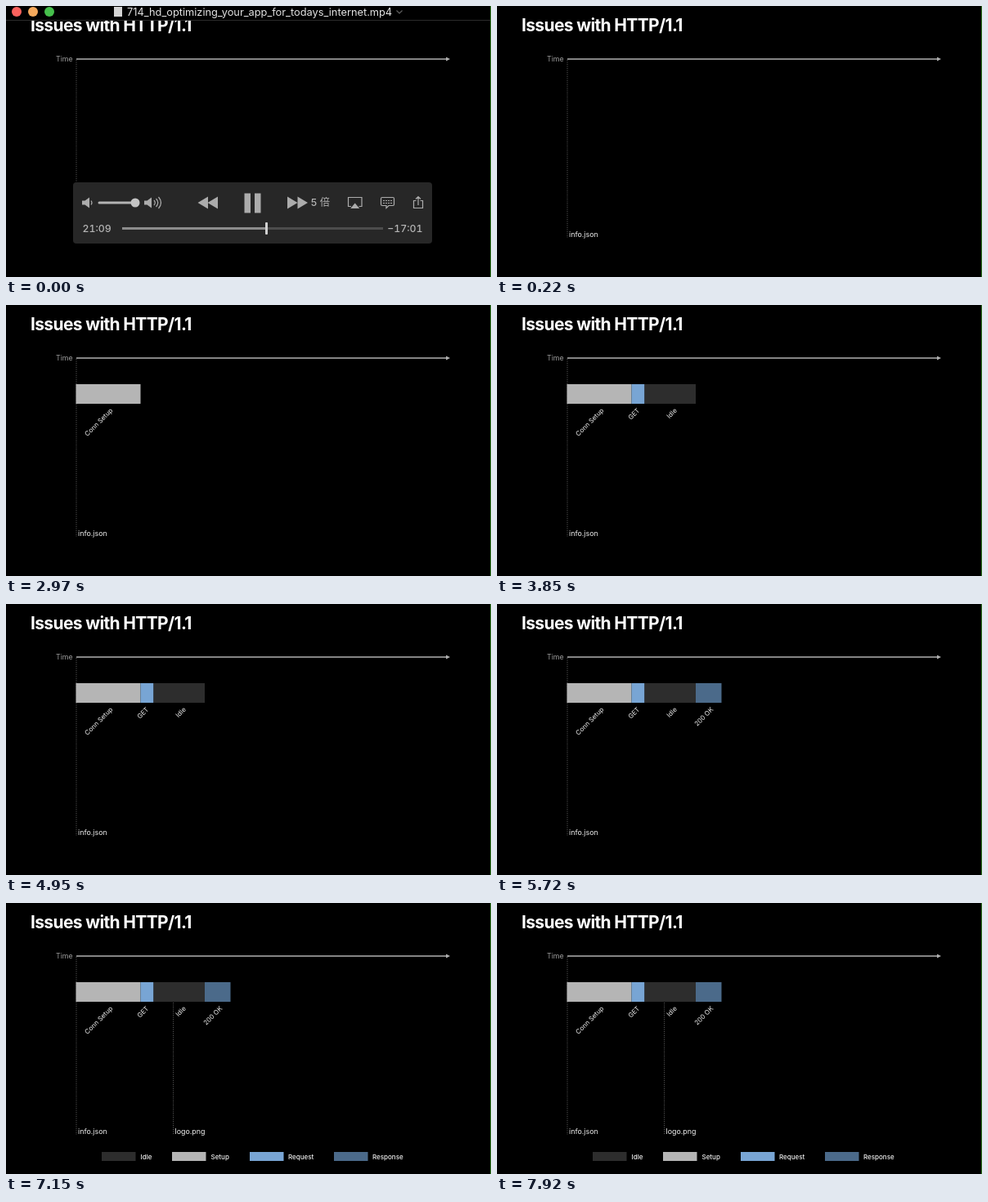
An HTML page for the animation above (8000 ms loop, 593 px wide and 332 px high).

```html
<!DOCTYPE html>
<html lang="en">
<head>
<meta charset="utf-8">
<title>Issues with HTTP/1.1</title>
<style>
  html, body { margin: 0; width: 100%; height: 100%; overflow: hidden; background: #000; }
  svg { display: block; width: 593px; height: 332px; }
  text { font-family: Inter, "Noto Sans CJK SC", "Noto Sans CJK JP", sans-serif; fill: #f2f2f2; }
  .title { font-size: 21px; font-weight: 700; letter-spacing: -.65px; fill: #fff; }
  .file { font-size: 8.9px; }
  .label { font-size: 8px; }
  .legend { font-size: 8px; font-weight: 500; }
  .dots { stroke: #5c5c5c; stroke-dasharray: 1 1.5; }
  .icon { fill: #acacac; }
  .line { fill: none; stroke: #acacac; stroke-width: 1.2; }
  .clock { font-size: 12.3px; font-weight: 500; font-variant-numeric: tabular-nums; fill: #b4b4b4; }
</style>
</head>
<body>
<svg viewBox="0 0 593 332">
  <rect width="593" height="332"/>
  <text class="title" x="30" y="30.8">Issues with HTTP/1.1</text>
  <text x="61" y="68.3" font-size="8.8" style="fill:#9a9a9a">Time</text>
  <path d="M86 65H539" stroke="#b0b0b0" stroke-width="1.5"/>
  <path d="M538 62.5L543 65L538 67.5Z" fill="#b0b0b0"/>
  <path class="dots" d="M86 66V284"/>
  <text class="file" x="88" y="283.2">info.json</text>

  <g id="chart"></g>
  <g id="legend"></g>
  <g id="logo">
    <path class="dots" d="M204.5 122V284"/>
    <text class="file" x="206.5" y="283.2">logo.png</text>
  </g>

  <g id="player">
    <rect width="593" height="17"/>
    <rect y="17" width="593" height="1" fill="#2a2a2a"/>
    <circle cx="13" cy="7" r="6" fill="#fc625d"/>
    <circle cx="33" cy="7" r="6" fill="#f5a95c"/>
    <circle cx="53" cy="7" r="6" fill="#46c04c"/>
    <rect x="132" y="1" width="10" height="12" fill="#d4d4d4"/>
    <text x="148" y="11.8" font-size="12.8" style="fill:#e2e2e2">714_hd_optimizing_your_app_for_todays_internet.mp4</text>
    <path d="M477.5 5.5L481 9L484.5 5.5" class="line" style="stroke:#606060"/>

    <rect x="82" y="216" width="439" height="75" rx="4" fill="#272727"/>
    <path id="speaker" class="icon" d="M93 238.5h3.5L102 234.5v13L96.5 243.5H93Z"/>
    <path class="line" d="M104 238.5q2 2.5 0 5"/>
    <path d="M114 241H155" stroke="#b4b4b4" stroke-width="3" stroke-linecap="round"/>
    <circle cx="158" cy="241" r="5.5" fill="#c4c4c4"/>
    <use href="#speaker" x="76"/>
    <path class="line" d="M181 238q2.5 3 0 6M183.5 236q4.5 5 0 10M186.5 234q6 7 0 14"/>
    <path class="icon" d="M247 233.5V248.5L234.5 241ZM259 233.5V248.5L246.5 241Z"/>
    <path class="icon" d="M344 233.5V248.5L356.5 241ZM356.5 233.5V248.5L369 241Z"/>
    <path class="icon" d="M291.5 229.5h7.5v24h-7.500ZM304 229.5h7.500v24h-7.500Z"/>
    <text class="clock" x="372.5" y="245.3">5 倍</text>
    <path class="line" d="M422 245.5H418.5V234.5H435V245.5H431.5"/>
    <path class="icon" d="M426.7 241.5L432.2 248H421.2Z"/>
    <path class="line" d="M460 234.5H473Q474.5 234.5 474.5 236V243Q474.5 244.5 473 244.5H468L465 247.5V244.5H460Q458.5 244.5 458.5 243V236Q458.5 234.5 460 234.5Z"/>
    <path class="line" stroke-dasharray="2 1" d="M461 238.5H472M461 241.5H472"/>
    <path class="line" d="M501.5 238.5H498.5V247.5H509.5V238.5H506.5M504 244V234M501 236.5L504 233.5L507 236.5"/>
    <text class="clock" x="93.5" y="276.8">21:09</text>
    <path d="M142 272.5H461" stroke="#4c4c4c" stroke-width="3"/>
    <path d="M142 272.5H318" stroke="#8c8c8c" stroke-width="3"/>
    <rect x="317" y="265" width="3" height="15" rx="1" fill="#d0d0d0"/>
    <text class="clock" x="509.5" y="276.8" text-anchor="end">−17:01</text>
  </g>
  <rect x="592" width="1" height="332" fill="#2a701b"/>
</svg>
<script>
const LOOP = 8000;
const COLORS = { setup: "#b5b5b5", get: "#78a5d4", idle: "#2d2d2d", ok: "#4b6a8a" };
const $ = id => document.getElementById(id);

function add(parent, tag, attrs, text = "") {
  const el = document.createElementNS("http://www.w3.org/2000/svg", tag);
  for (const key in attrs) el.setAttribute(key, attrs[key]);
  el.textContent = text;
  return parent.appendChild(el);
}

// Bars: key, left, right, label, right end of label
[
  ["setup", 85.5, 164.5, "Conn Setup", 131],
  ["get", 164.5, 180.5, "GET", 175],
  ["idle", 180.5, 243, "Idle", 220.5],
  ["ok", 243, 274.5, "200 OK", 265]
].forEach(([id, left, right, label, end]) => {
  const g = add($("chart"), "g", { id });
  add(g, "rect", { x: left, y: 97, width: right - left, height: 24, fill: COLORS[id] });
  add(g, "text", {
    class: "label", "text-anchor": "end", transform: `translate(${end} 129.8) rotate(-45)`
  }, label);
});

// Legend: key, swatch left, label, label left
[
  ["idle", 117, "Idle", 164.5],
  ["setup", 203, "Setup", 250.5],
  ["get", 298, "Request", 345],
  ["ok", 401, "Response", 448]
].forEach(([key, left, label, x]) => {
  add($("legend"), "rect", { x: left, y: 305, width: 41.5, height: 11, fill: COLORS[key] });
  add($("legend"), "text", { class: "legend", x, y: 313.7 }, label);
});

// When each part is on the stage, in ms
const parts = [
  ["player", 0, 220],
  ["setup", 1320, LOOP],
  ["get", 3190, LOOP],
  ["idle", 3850, LOOP],
  ["ok", 5500, LOOP],
  ["legend", 5830, LOOP],
  ["logo", 7150, LOOP]
].map(([id, from, to]) => ({ el: $(id), from, to }));

const start = performance.now();
function draw() {
  const t = (performance.now() - start) % LOOP;
  for (const { el, from, to } of parts)
    el.style.display = t >= from && t < to ? "" : "none";
  requestAnimationFrame(draw);
}
draw();
</script>
</body>
</html>
```
